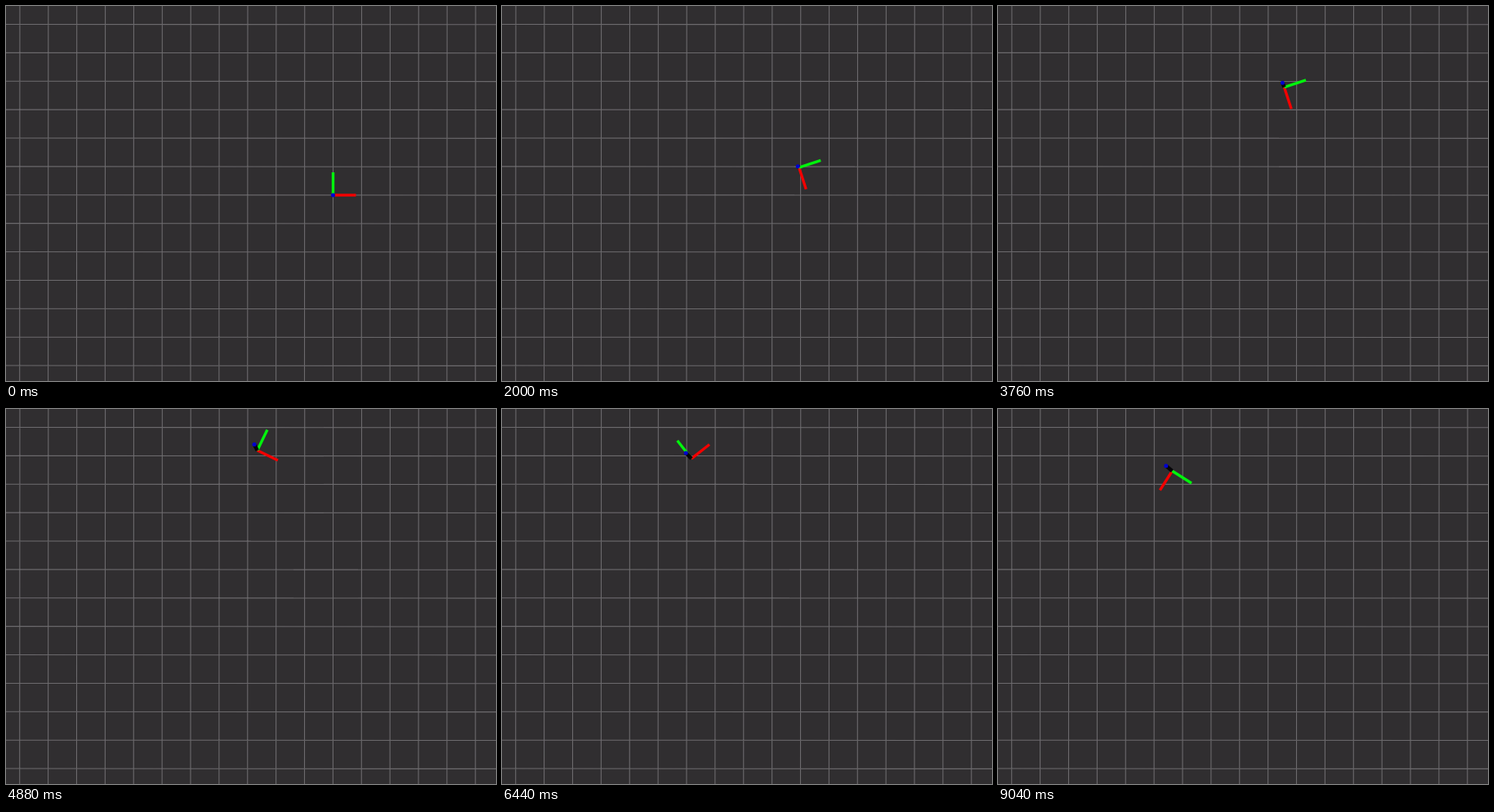
An HTML page that plays this animation: 600 px wide and 460 px high, repeating every 9.12 s.

```html
<!DOCTYPE html>
<html lang="en">
<head>
<meta charset="utf-8">
<title>Moving frame on a grid</title>
<style>
  html, body { margin: 0; width: 100%; height: 100%; overflow: hidden; background: #302e30; }
  svg { display: block; width: 600px; height: 460px; }
</style>
</head>
<body>
<svg viewBox="0 0 600 460">
  <rect width="600" height="460" fill="#302e30"/>
  <path id="grid" fill="none" stroke="#6c6a6d" stroke-width="1.1"/>
  <line id="xAxis" stroke="#f40000" stroke-width="3.4"/>
  <line id="yAxis" stroke="#00f40c" stroke-width="3.4"/>
  <line id="zAxis" stroke="#050508" stroke-width="4.6"/>
  <circle id="zTip" r="2.5" fill="#0000d0"/>
</svg>
<script>
const LOOP = 9120;
const CENTER = { x: 400.5, y: 232 };
const CELL = 34.88;
const TILT = 0.03;
const LENGTH = 28;
const HEIGHT = 0.04; // perspective shift of the axis that points at the viewer

// The frame reverses along its red axis, brakes near the goal, then spins.
const START = 9, STOP = 84;
const ROUTE = 329, TOP_SPEED = 5.55, ACCELERATION = 0.92, BRAKING = 0.1;
const TURNS = [
  { until: 21, rate: 6 },
  { until: 29, rate: 2.6 },
  { until: 39, rate: -2.1 },
  { until: 51, rate: -3.83 },
  { until: 65, rate: -4.55 },
  { until: STOP, rate: -0.15 },
  { until: Infinity, rate: 16.3 }
];

const byId = id => document.getElementById(id);
const radians = degrees => degrees * Math.PI / 180;
const setAll = (node, attrs) => {
  for (const key in attrs) node.setAttribute(key, attrs[key]);
};

function poseAt(step) {
  let { x, y } = CENTER, angle = 0, speed = 0, left = ROUTE;
  for (let n = START; n < step; n++) {
    const { rate } = TURNS.find(turn => n < turn.until);
    speed = n < STOP ? Math.min(TOP_SPEED, speed + ACCELERATION, left * BRAKING) : 0;
    const heading = radians(angle + rate / 2);
    x -= speed * Math.cos(heading);
    y -= speed * Math.sin(heading);
    left -= speed;
    angle += rate;
  }
  return { x, y, angle: radians(angle) };
}

function drawGrid() {
  let d = "";
  for (let k = -14; k <= 14; k++) {
    const x = CENTER.x + k * CELL, y = CENTER.y + k * CELL;
    d += `M${x} -40V500M-40 ${y}H640`;
  }
  setAll(byId("grid"), { d, transform: `rotate(${TILT} ${CENTER.x} ${CENTER.y})` });
}

function drawAxis(id, x, y, dx, dy) {
  setAll(byId(id), { x1: x, y1: y, x2: x + dx, y2: y + dy });
}

function render(time) {
  // Poses arrive every 96 ms, shown on a 40 ms clock.
  const step = Math.floor((Math.floor(time / 40) + 0.5) / 2.4);
  const { x, y, angle } = poseAt(step);
  const c = LENGTH * Math.cos(angle), s = LENGTH * Math.sin(angle);
  const zx = (x - CENTER.x) * HEIGHT, zy = (y - CENTER.y) * HEIGHT;
  drawAxis("xAxis", x, y, c, s);
  drawAxis("yAxis", x, y, s, -c);
  drawAxis("zAxis", x, y, zx, zy);
  setAll(byId("zTip"), { cx: x + zx, cy: y + zy });
}

drawGrid();
render(0);
const start = performance.now();
(function tick() {
  render((performance.now() - start) % LOOP);
  requestAnimationFrame(tick);
})();
</script>
</body>
</html>
```
